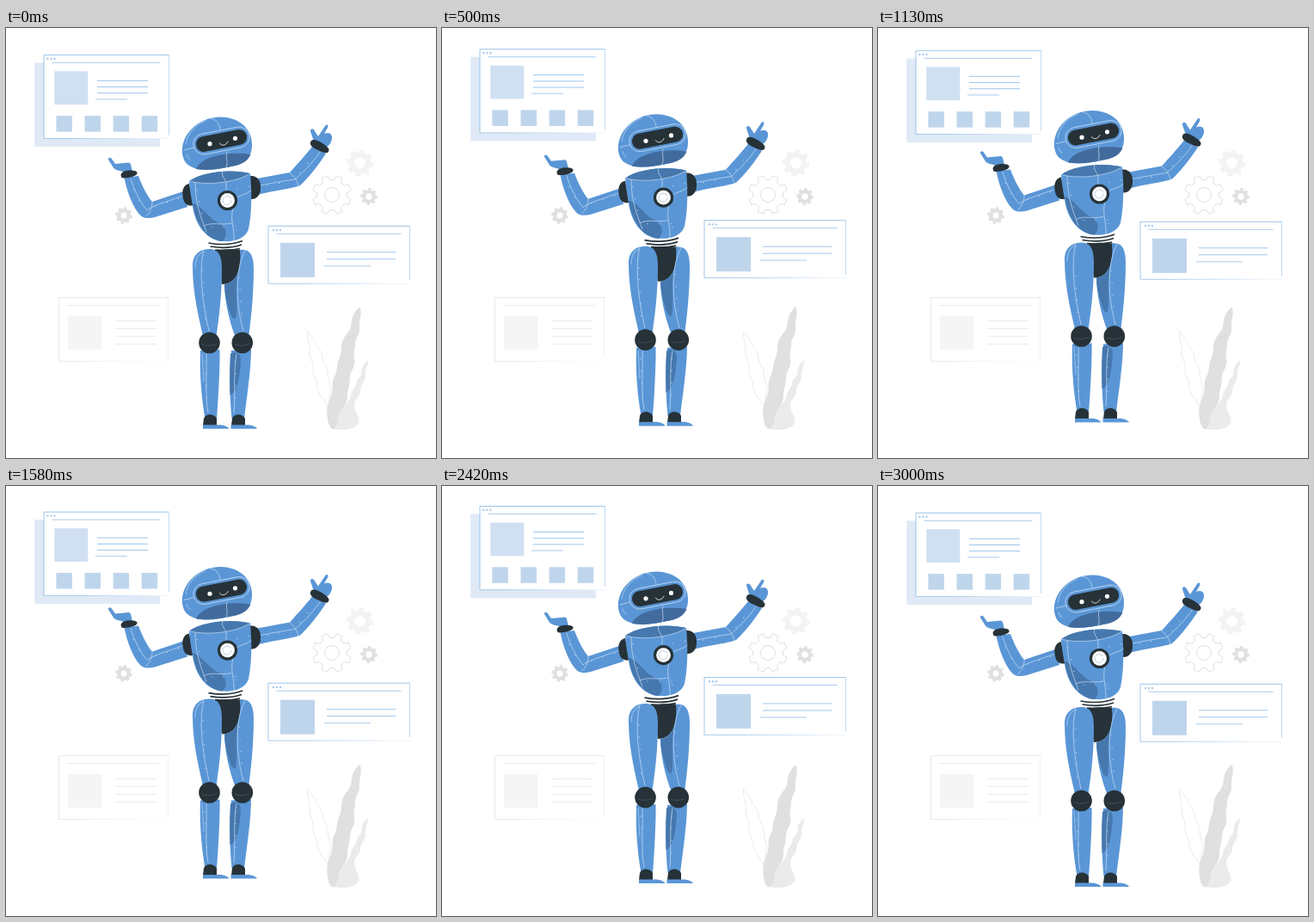
An HTML page that plays this animation: 500x500 px, repeating every 3.04 s.

```html
<!DOCTYPE html>
<html lang="en">
<head>
<meta charset="utf-8">
<title>Robot with floating windows</title>
<style>
  html, body { margin: 0; width: 100%; height: 100%; overflow: hidden; background: #fff; }
  svg { display: block; width: 100%; height: 100%; }
  .blue { fill: #5a96d6; }
  .shade { fill: #4678ae; }
  .dark { fill: #263238; }
  .seam { fill: none; stroke: #d3e5f7; stroke-width: .65; stroke-linecap: round; }
  .shine { fill: none; stroke: #8bb8e6; stroke-width: 1.3; stroke-linecap: round; }
  .rivets { fill: none; stroke: #d3e5f7; stroke-width: 1.2; stroke-linecap: round; stroke-dasharray: 0 14; }
</style>
</head>
<body>
<svg viewBox="0 0 500 500">
  <defs>
    <linearGradient id="fadeBlue" x2="1">
      <stop offset=".2" stop-color="#93bfe6"/><stop offset=".9" stop-color="#e8f1fa"/>
    </linearGradient>
    <linearGradient id="fadeGray" x2="1">
      <stop offset=".15" stop-color="#e6e6e6"/><stop offset=".8" stop-color="#fafafa"/>
    </linearGradient>
  </defs>

  <g id="still"></g>
  <g id="plant">
    <path fill="#ebebeb" d="M421.500 386C416 390 413 394 413.500 400C413.500 406 408 407 407.500 412C407 418 402 420 401 427C400 434 394 437 390 446L379 466C390 468 406 468 410 459C412 452 405 446 405 439C405 431 412 429 412 422C412 415 418 411 418 405C417 398 421 393 421.500 386Z"/>
    <path fill="#e0e0e0" d="M411.500 324C404 330 402 337 401.500 345C401 353 393 357 391 365C389 372 391 377 387.500 384C384 391 386 398 382 405C378 412 381 420 378 428C374 436 372 444 374 455C375 463 378 467 382 466C387 460 385 454 389 447C393 439 397 436 397 427C397 420 400 415 400 407C400 399 406 395 405.500 387C403 380 406 375 406 368C406 361 412 356 411 349C410 340 415 333 411.500 324Z"/>
    <path fill="none" stroke="#e2e2e2" stroke-width=".7" d="M350.500 352.500C350 363 354 367 353 375C352 383 358 388 357 396C356 405 362 409 362 418C363 427 369 431 374 440C377 431 376 427 378 420C376 411 374 407 374 400C373 392 368 390 368 382C367 374 361 373 360 366C357 360 354 357 350.500 352.500Z"/>
  </g>

  <g id="windows"></g>

  <g id="robot">
    <!-- legs -->
    <path class="blue" d="M262 375L285 374C285 396 280 430 277 454H262.500C260 430 259.500 400 262 375Z"/>
    <path class="shade" d="M261 379C266 375 273 378 273 386C272 405 269 424 260.500 427C260 410 260 393 261 379Z"/>
    <path class="blue" d="M226 375L248.500 374C249 390 247 430 245 454H231.500C227 430 225 400 226 375Z"/>
    <path class="dark" d="M243 259C250 257 265 257 274 258C274 280 269 298 251 298Z"/>
    <path class="blue" d="M272 258C284 256 288 265 288 280C288 310 285 338 282 360H267C259 340 254 315 254 298C267 296 274 282 272 258Z"/>
    <path class="shade" d="M254 298C262 297 267 292 270 284C266 302 270 325 267 338C263 339 261 333 259 326C256 316 254 307 254 298Z"/>
    <path class="blue" d="M217 277C217 262 226 257 238 257C249 258 251 268 251 280C251 310 248 335 244 362H230C224 337 217 308 217 277Z"/>
    <path class="shine" d="M220 278C220 268 223 263 229 260M228 379L230 411"/>
    <path class="seam" d="M230 259C224 280 228 318 236 352M278 259C265 282 268 325 276 352M233 379C234 402 231 427 235 447M268 379C264 401 267 425 265 447"/>
    <path class="rivets" d="M229 282L232 344M271 290L275 342M231 388L234 438M267 388V440"/>
    <g class="dark">
      <circle cx="236.500" cy="366" r="12.300"/><circle cx="274.800" cy="366" r="12.300"/>
      <path id="ankle" d="M229 462L230 454C232 448 242 448 245 454V462Z"/>
      <use href="#ankle" x="33"/>
    </g>
    <path fill="none" stroke="#52636c" stroke-width=".6" d="M228 368Q236 371 245 367M266 368Q275 371 283 367"/>
    <path id="foot" class="blue" d="M229 461.500H245C252 461 258 463 259.500 466H229Z"/>
    <use href="#foot" x="32.500"/>

    <!-- arms -->
    <path class="blue" d="M209 189L170 202C164 195 158 183 154 172L137.500 174C141 192 148 209 156 217.500C160 222 167 221.500 173 220L211 208Z"/>
    <path class="seam" d="M145 175C149 190 158 205 164 212C169 207 187 202 206 195M163 219C169 212 170 208 170 202"/>
    <path class="rivets" d="M148 188L158 206M174 207L205 197"/>
    <path class="blue" d="M137 168C134 165 127 167 124 161L119 153C118.500 150 122 150 123.500 153L127 158L143 156.500C146 157 145 162 147.500 167Z"/>
    <path class="dark" d="M133.500 171C134 165 150 164 152.500 168C154 173 137 175.500 134.500 174Z"/>
    <path class="blue" d="M292 175L330 168C339 158 349 147 356 138L372 146C363 160 351 175 342 183C332 187 316 188 292 194Z"/>
    <path class="seam" d="M366 143C355 159 343 170 336 176C321 178 307 181 295 183M330 168.500C335 172 339 178 340 184"/>
    <path class="rivets" d="M304 183L331 178M342 168L358 148"/>
    <path class="blue" d="M358 132L354 120C354 116 358 117 359 120L363 126L371 114C373 111 375.500 113 374 116L370 123C376 120 380 124 379 129C378 134 375 138 371 139Z"/>
    <path class="dark" d="M355 131C359 127 373 136 375.500 141C376 148 368 145 363 142C358 140 351 136 355 131Z"/>
    <path class="dark" d="M213 181C206 182 204 190 206 198C207 205 213 208 218 206ZM284 172C292 171 297 178 296 187C296 194 291 200 284 199Z"/>

    <!-- torso -->
    <path fill="none" stroke="#263238" stroke-width="1.700" d="M235.500 250Q258 254 275 247.500M237.500 254Q258 257.500 274 252M243 258Q258 259.500 272 256.500"/>
    <path class="blue" d="M213 178C227 168 260 163 284 169C286 190 286 215 282 234C278 245 266 249 252 248C234 247 220 230 217 207C215 195 213.500 186 213 178Z"/>
    <path class="shade" d="M217 204C226 204 237 223 248 227C257 231 258 242 252 248C235 247 221 230 217 204Z"/>
    <path class="shade" d="M213 178C228 167 262 163.500 284 169C270 179 235 184 213 178Z"/>
    <path class="seam" d="M213 178C235 184 270 179 284 169M252 166C250 172 254 175 256 179V189M220 180C220 203 226 219 233 237M264 210C260 222 266 234 265 247M230 230C241 225 249 230 262 227M269 197C275 193 279 194 285 189"/>
    <path class="rivets" d="M222 188L229 222M269 187L283 184M239 231H268M268 235L267 240"/>
    <circle class="dark" cx="257.500" cy="200.500" r="11.600"/>
    <circle fill="#fff" cx="257.500" cy="200.500" r="8.400"/>
    <path fill="none" stroke="#b9cad6" stroke-width=".9" d="M262 200A5 5 0 1 1 260 196.500L262 198"/>

    <!-- head -->
    <path class="blue" d="M205 146C203 125 222 103.500 250 103.500C272 104 286 118 286 135C286.500 150 278 158 262 161C245 165 225 168 213 160C208 157 206 152 205 146Z"/>
    <path fill="#426b9d" d="M221 164C227 148 262 143 284.500 147C281 156 272 159.500 262 161C248 164 234 166 221 164Z"/>
    <path class="shine" d="M209 135C211 122 221 112 232 108M210 147Q211 151 214 153"/>
    <path class="seam" d="M237 105C244 106 248 110 249 118M207 142L219 139M257 144C255 151 259 156 256 162M281 123L285 121"/>
    <g transform="rotate(-11 250.500 131)">
      <rect x="217.500" y="119" width="66" height="24" rx="12" fill="#5a96d6" stroke="#c9def3" stroke-width=".8"/>
      <rect class="dark" x="220.500" y="122" width="60" height="18" rx="9"/>
    </g>
    <circle fill="#fff" cx="237" cy="134.700" r="2.600"/>
    <circle fill="#fff" cx="266.500" cy="128.300" r="2.600"/>
    <path fill="none" stroke="#fff" stroke-width=".8" stroke-linecap="round" d="M248.500 134C250 137.500 256 137 258 132"/>
  </g>
</svg>
<script>
const PERIOD = 3040, STEP = 1000 / 24, LIFT = 10;
const byId = id => document.getElementById(id);

function add(parent, tag, attrs) {
  const el = document.createElementNS('http://www.w3.org/2000/svg', tag);
  for (const key in attrs) el.setAttribute(key, attrs[key]);
  parent.appendChild(el);
  return el;
}

const rect = (g, x, y, width, height, fill) => add(g, 'rect', { x, y, width, height, fill });
const line = (g, x1, x2, y, stroke, w = .8) =>
  add(g, 'path', { d: `M${x1} ${y}H${x2}`, stroke, 'stroke-width': w, fill: 'none' });

// White panel with a title bar; its bottom edge fades to the right.
function panel(g, x, y, w, h, color, fade) {
  rect(g, x, y, w, h, '#fff');
  add(g, 'path', { d: `M${x} ${y + h}V${y}H${x + w}`, fill: 'none', stroke: color, 'stroke-width': .9 });
  add(g, 'path', { d: `M${x + w} ${y}V${y + h - 4}`, stroke: color, 'stroke-width': .8, opacity: .7 });
  rect(g, x, y + h - .4, w, .8, `url(#${fade})`);
  line(g, x + 9.5, x + w - 10, y + 9, color);
}

function dots(g, x, y) {
  for (let i = 0; i < 3; i++) add(g, 'circle', { cx: x + i * 4, cy: y, r: 1.2, fill: '#a9caea' });
}

function gear(g, cx, cy, r, hole, turn, paint) {
  const teeth = 8, radii = [.79, 1, 1, .79], spread = [-.3, -.2, .2, .3];
  let d = '';
  for (let i = 0; i < teeth; i++) {
    radii.forEach((k, j) => {
      const a = (i + spread[j]) / teeth * 2 * Math.PI + turn;
      d += `${d ? 'L' : 'M'}${(cx + r * k * Math.cos(a)).toFixed(2)} ${(cy + r * k * Math.sin(a)).toFixed(2)}`;
    });
  }
  d += `ZM${cx - hole} ${cy}a${hole} ${hole} 0 1 0 ${2 * hole} 0a${hole} ${hole} 0 1 0 ${-2 * hole} 0Z`;
  add(g, 'path', { d, 'fill-rule': 'evenodd', 'stroke-linejoin': 'round', ...paint });
}

const still = byId('still'), windows = byId('windows'), robot = byId('robot');
const BLUE = '#93bfe6', GRAY = '#e8e8e8';

panel(still, 61.5, 313.5, 127, 74, GRAY, 'fadeGray');
rect(still, 72, 335, 39.5, 39, '#f5f5f5');
for (const y of [340.5, 349.5, 358.5, 367.5]) line(still, 127, 175, y, GRAY);

gear(still, 137, 218, 10, 3.5, .2, { fill: '#e0e0e0' });
gear(still, 411.5, 157, 16, 6.5, .15, { fill: '#f3f3f3' });
gear(still, 422, 196, 10, 3.8, .1, { fill: '#e0e0e0' });
gear(still, 379, 194, 22.7, 8.5, Math.PI / 8, { fill: '#fff', stroke: '#d9d9d9', 'stroke-width': .8 });

rect(windows, 33.3, 40.3, 145.7, 97.8, '#dfeaf6');
panel(windows, 44, 31.3, 145.5, 97.3, BLUE, 'fadeBlue');
dots(windows, 48.4, 35.7);
rect(windows, 56.3, 50.3, 39, 38.8, '#d0e0f2');
for (const y of [61.3, 68.5, 75.7]) line(windows, 106, 165, y, BLUE, .9);
line(windows, 104, 141, 82.9, BLUE);
for (let i = 0; i < 4; i++) rect(windows, 58.4 + i * 33.1, 102.1, 18.5, 18.5, '#bfd5ec');

panel(windows, 305, 230.3, 164.5, 66.9, BLUE, 'fadeBlue');
dots(windows, 311, 235);
rect(windows, 319, 249.8, 40, 40, '#bfd5ec');
for (const y of [260.8, 268.8]) line(windows, 373, 453, y, BLUE, .9);
line(windows, 370, 424, 276.8, BLUE);

// Linear rise and fall: 0 at both ends, LIFT halfway.
function lift(ms, period) {
  const p = ms % period / period;
  return LIFT * (1 - Math.abs(2 * p - 1));
}

function render(ms) {
  const t = Math.floor((ms % PERIOD + 4) / STEP) % 73 * STEP;
  windows.setAttribute('transform', `translate(0 ${-lift(t, 1500)})`);
  robot.setAttribute('transform', `translate(0 ${-lift(t, 3000)})`);
}

const start = performance.now();
function tick() {
  render(performance.now() - start);
  requestAnimationFrame(tick);
}
tick();
</script>
</body>
</html>
```
